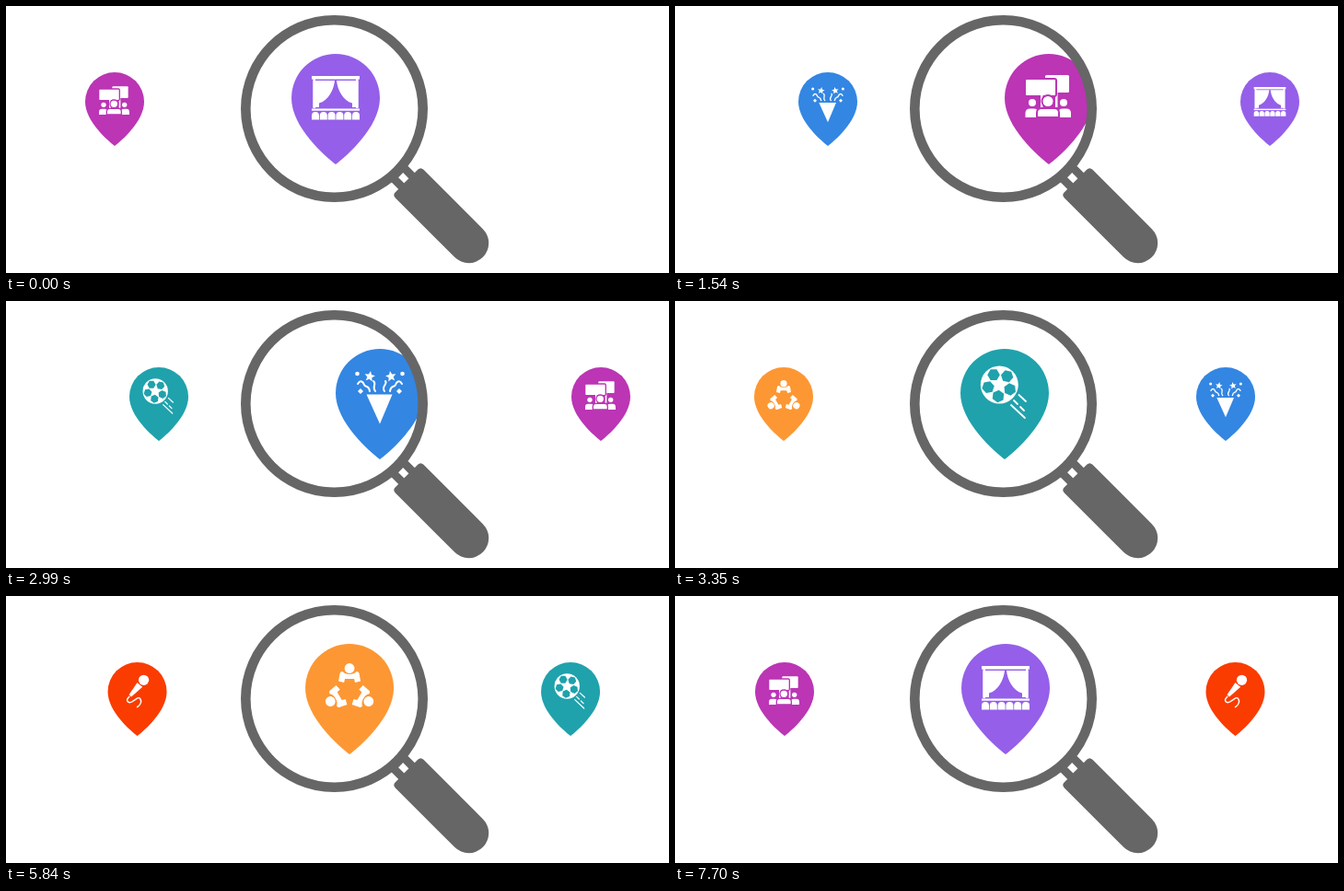
These frames come from a looping animation (720 px wide and 290 px high, 8700 ms). An HTML page:

```html
<!DOCTYPE html>
<html lang="en">
<head>
<meta charset="utf-8">
<title>Event finder</title>
<style>
  html, body { margin: 0; width: 100%; height: 100%; overflow: hidden; background: #fff; }
  svg { display: block; width: 720px; height: 290px; }
</style>
</head>
<body>
<svg viewBox="0 0 720 290">
  <defs><clipPath id="glass"><circle cx="356.5" cy="111.5" r="92"/></clipPath></defs>
  <g id="small"></g>
  <circle cx="356.5" cy="111.5" r="96" fill="#fff"/>
  <g clip-path="url(#glass)"><g id="big"></g></g>
  <g transform="translate(356.5 111.5) rotate(45)" fill="#666">
    <path d="M98-12.500H113V12.500H98Z"/>
    <path d="M102-3.600H111V3.600H102Z" fill="#fff"/>
    <path d="M115.500-21.700H206.500A21.700 21.700 0 0 1 206.500 21.700H115.500Q111 21.700 111 17.200V-17.200Q111-21.700 115.500-21.700Z"/>
    <circle r="96.2" fill="none" stroke="#666" stroke-width="10.6"/>
  </g>
</svg>
<script>
const LOOP = 8700, GAP = 240, STEP = 30;

// Each slide: time of its first step, number of steps, strip offset at its end.
const slides = [
  [30, 15, 240], [1480, 15, 480], [2930, 15, 720],
  [4420, 14, 960], [5840, 16, 1201], [7280, 15, 1441]
];

const repeat = (n, fn) => Array.from({ length: n }, (_, i) => fn(i)).join('');
const dot = (x, y, r, extra = '') => `<circle cx="${x}" cy="${y}" r="${r}" ${extra}/>`;
const box = (x, y, w, h, r = 0, extra = '') =>
  `<rect x="${x}" y="${y}" width="${w}" height="${h}" rx="${r}" ${extra}/>`;
const line = (d, w) => `<path d="${d}" fill="none" stroke="#fff" stroke-width="${w}" stroke-linecap="round"/>`;

// Regular polygon, or a star when the inner radius differs.
function poly(x, y, n, r, inner, turn, fill) {
  const count = inner ? n * 2 : n;
  const pts = Array.from({ length: count }, (_, i) => {
    const a = turn + i * 2 * Math.PI / count, d = inner && i % 2 ? inner : r;
    return (x + d * Math.cos(a)).toFixed(2) + ',' + (y + d * Math.sin(a)).toFixed(2);
  });
  return `<polygon points="${pts.join(' ')}" fill="${fill}"/>`;
}

// Icons use the pin's middle as their origin and its colour for gaps.
function stage() {
  const curtain = '<path d="M-24.5-31H-1C-2-21-8-9-18-6.500V-2H-24.500Z"/>';
  return box(-26, -36, 52, 3.600) + box(-24.5, -33, 2.500, 32) + box(22, -33, 2.500, 32) +
    curtain + `<g transform="scale(-1 1)">${curtain}</g>` + box(-26, -0.5, 52, 2.200) +
    repeat(6, i => `<path d="M${-26 + i * 8.8} 11.500V7A4 4 0 0 1 ${-18 + i * 8.8} 7V11.500Z"/>`);
}

function rally(color) {
  const edge = `stroke="${color}" stroke-width="2"`;
  const body = (x, w, top) =>
    `<path d="M${x - w} 9V${top + 5}Q${x - w} ${top} ${x - w + 5} ${top}H${x + w - 5}Q${x + w} ${top} ${x + w} ${top + 5}V9Z"/>`;
  return box(-4, -37, 26, 19, 1.500) + box(7, -19, 2.500, 17) +
    box(-26, -33, 34, 19, 2, edge) + box(-9, -15, 2.500, 18) +
    body(-18.5, 7, -0.5) + body(17, 7, -0.5) + dot(-18, -7, 4) + dot(16, -7, 4) +
    `<g ${edge}>${body(-1, 12, -1)}</g>` + dot(-1, -8.500, 6.500, edge);
}

function party() {
  return '<path d="M-14.500-10.500H13.500L0 21.500Z"/>' +
    poly(-11, -30, 5, 6, 2.700, -1.400, '#fff') + poly(12, -30, 5, 6, 2.700, -1.740, '#fff') +
    dot(-24.500, -33, 2.300) + dot(24.500, -33, 2.300) +
    poly(-21, -14, 4, 3, 0, 0, '#fff') + poly(21, -14, 4, 3, 0, 0, '#fff') +
    line('M-24-22C-21-27-18-24-17-21S-12-21-11-14', 2) +
    line('M24-22C21-27 18-24 17-21S12-21 11-14', 2) +
    line('M-7-25C-3-22-9-19-5-14M6-25C9-22 1-19 5-14', 2);
}

function football(color) {
  return dot(-5.700, -21, 20.500) +
    repeat(5, i => {
      const a = (-120 + i * 72) * Math.PI / 180;
      return poly(-5.7 + 12.5 * Math.cos(a), -21 + 12.5 * Math.sin(a), 6, 6.800, 0, a, color);
    }) +
    line('M15.500-10L23-3M10-4L14 0M17 3L21 7M7 1L22 15', 1.800);
}

function meeting() {
  const person = dot(0, -24, 5.400) +
    '<path d="M-12-10L-10.500-18.500Q-10-20.500-7.500-20.500C-5-16.500 5-16.500 7.500-20.500Q10-20.500 10.500-18.500L12-10L6-8.500L5-12.500H-5L-6-8.500Z"/>';
  return '<g transform="translate(0 -9.5)">' +
    repeat(3, i => `<g transform="rotate(${i * 120})">${person}</g>`) + '</g>';
}

function mic(color) {
  return '<path d="M0-27L8.500-20L-9.700-3.700L-13.500-7Z"/>' +
    dot(10.500, -31, 9.800, `fill="${color}"`) + dot(10.500, -31, 8.400) +
    line('M-13-4C-20 2-15 8-8 4S2-5 5 0S4 10 0 13', 2.200);
}

const kinds = [
  ['#955fe9', stage], ['#bb35b5', rally], ['#3386e2', party],
  ['#1fa2ac', football], ['#fd9733', meeting], ['#fa3c00', mic]
];

function strip(id, scale, micShift) {
  const node = document.getElementById(id);
  node.innerHTML = repeat(8, i => {
    const [color, icon] = kinds[i % 6];
    const x = 358 - GAP * i + (icon === mic ? micShift : 0);
    return `<g transform="translate(${x} 112) scale(${scale})" fill="#fff">` +
      `<path fill="${color}" d="M0 60C-11 51.500-48 20-48-12A48 48 0 0 1 48-12C48 20 11 51.500 0 60Z"/>` +
      icon(color) + '</g>';
  });
  return node;
}

const strips = [strip('small', 2 / 3, 9.500), strip('big', 1, 0.500)];

function offsetAt(t) {
  let from = 0;
  for (const [start, steps, to] of slides) {
    if (t < start) break;
    const k = Math.min(steps, Math.floor((t - start) / STEP) + 1);
    from += (to - from) * k / steps;
  }
  return from;
}

function draw(t) {
  const x = offsetAt(t);
  strips.forEach(s => s.setAttribute('transform', `translate(${x.toFixed(2)} 0)`));
}

const begin = performance.now();
function tick() {
  draw((performance.now() - begin) % LOOP);
  requestAnimationFrame(tick);
}
draw(0);
requestAnimationFrame(tick);
</script>
</body>
</html>
```
